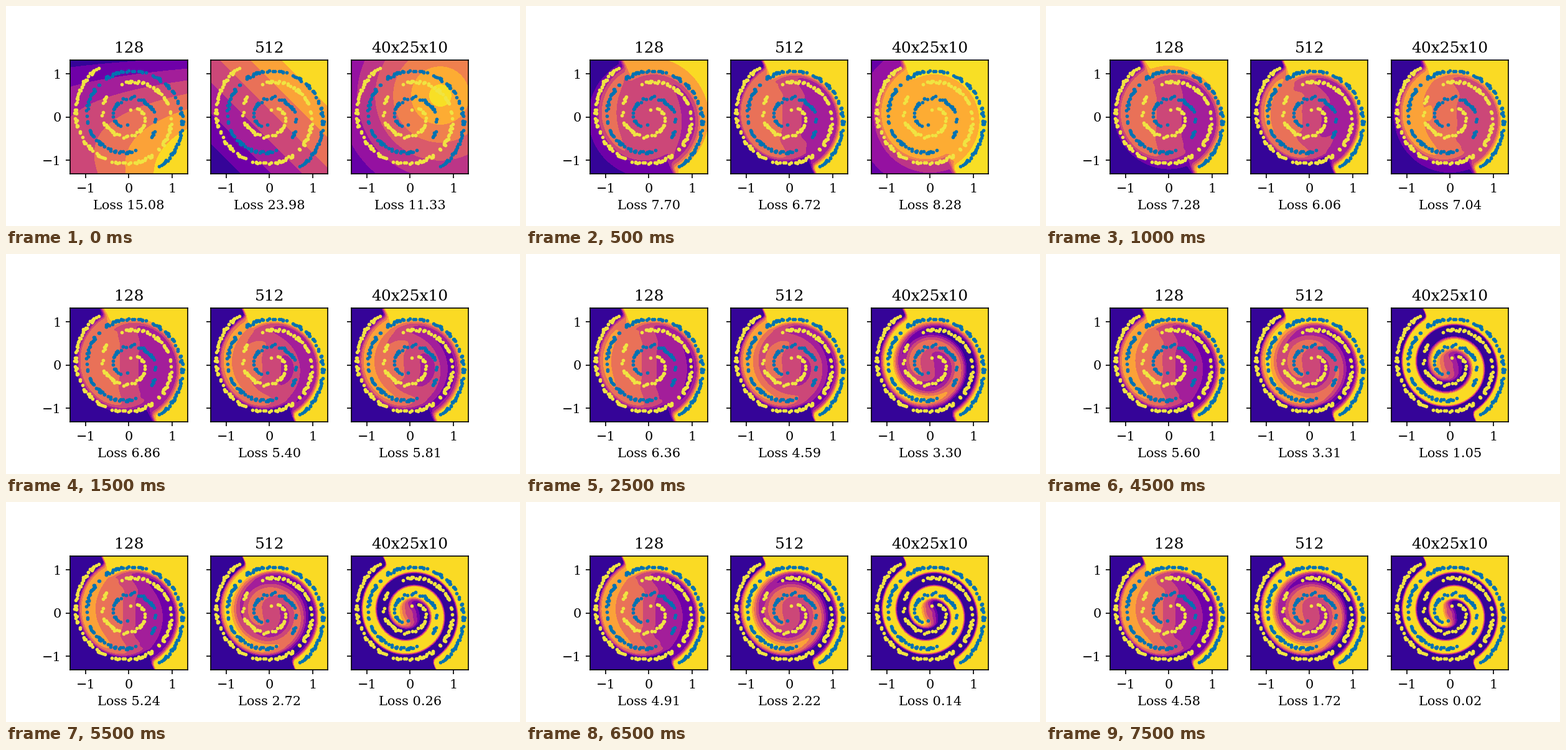
These frames come from a looping animation (826x354 px, 8000 ms). A matplotlib script:

```python
import numpy as np
import matplotlib.pyplot as plt
from matplotlib.animation import FuncAnimation

plt.rcParams["font.family"] = "DejaVu Serif"

DPI = 150
XMAX, YMAX = 1.356, 1.318
TITLES = ["128", "512", "40x25x10"]
BLUE, YELLOW = "#0072b2", "#f0e442"

# Loss of each network at a few key times
LOSS_T = [0, 1, 3, 5, 7, 11, 15]
LOSS = [
    [15.08, 7.70, 6.86, 6.36, 5.96, 5.24, 4.58],
    [23.98, 6.72, 5.40, 4.59, 3.90, 2.72, 1.72],
    [11.33, 8.28, 5.81, 3.30, 1.84, 0.26, 0.02],
]

X, Y = np.meshgrid(np.linspace(-XMAX, XMAX, 140), np.linspace(-YMAX, YMAX, 140))
R = np.hypot(X, Y)


def smooth(z, size=11):
    """Separable blur with the edges repeated."""
    k = np.hanning(size + 2)[1:-1]
    k /= k.sum()
    z = np.pad(z, size // 2, mode="edge")
    for axis in (0, 1):
        z = np.apply_along_axis(np.convolve, axis, z, k, mode="valid")
    return z


def spiral(limit=13.7):
    """Arm pattern (+1 yellow, -1 blue) and weight of the zone outside it."""
    a = np.arctan2(Y, X)
    last = np.pi * np.floor((limit + a) / np.pi) - a
    turn = np.minimum(np.maximum(10 * R, 2.8), last)
    w = np.clip((10 * R - last + np.pi / 2 + .6) / 1.6, 0, 1)
    return smooth(np.cos(turn + a - np.pi)), smooth(w * w * (3 - 2 * w))


ARMS, OUTSIDE = spiral()


def untrained(panel):
    """Almost linear ramps of the fresh networks."""
    if panel == 0:
        return 4.2 + .9 * X - 1.6 * Y - .7 * Y**2 - .5 * X * Y
    if panel == 1:
        return 3.75 + 1.4 * (X + Y)
    return 7.6 - 2.4 * np.hypot(X - .7, Y - .5)


def progress(panel, t):
    """Mean level, left-right slope, contrast inside and outside the spiral."""
    s = t - 1
    if panel == 0:
        return 3.5, 1.7 * (1 - np.exp(-t / 2.5)), .04 * t, 1.8 + .35 * t
    if panel == 1:
        return 3.6, 1.2 * np.exp(-t / 20), .25 * t, 3.5 + .5 * t
    return (3.2 + 3 * np.exp(-s), 1.6 * s * np.exp(-s / 2),
            .25 * s**2, 3 + .1 * s**2)


def field(panel, t):
    if t == 0:
        return untrained(panel)
    mean, slope, inner, outer = progress(panel, t)
    contrast = inner * R**1.5 * (1 - OUTSIDE) + outer * R / 1.2 * OUTSIDE
    tilt = slope * np.tanh(2 * X) * (1 - OUTSIDE)
    return mean - tilt - np.minimum(contrast, 12) * ARMS


def two_spirals(count=200, noise=.5):
    rng = np.random.RandomState(4)
    deg = 780 * np.sqrt(rng.rand(count))
    deg = deg[(deg > 95) & ((deg < 401) | (deg > 422))]
    n = np.radians(deg)
    x = -np.cos(n) * n + rng.rand(n.size) * noise
    y = np.sin(n) * n + rng.rand(n.size) * noise
    return x / 10, y / 10


fig, axes = plt.subplots(1, 3, sharey=True, dpi=DPI,
                         figsize=(826.01 / DPI, 354.01 / DPI))
sx, sy = two_spirals()
for ax, title in zip(axes, TITLES):
    ax.set(title=title, aspect="equal", xticks=[-1, 0, 1], yticks=[-1, 0, 1])
    for sign, color in ((-1, BLUE), (1, YELLOW)):
        ax.plot(sign * sx, sign * sy, "o", ms=2.7, mew=0, color=color)

fills = []


def update(t):
    while fills:
        fills.pop().remove()
    for i, ax in enumerate(axes):
        bands = 8 if i == 2 and t < 2 else 7
        z = np.clip(field(i, t), .02, bands - .02)
        fills.append(ax.contourf(X, Y, z, levels=np.arange(bands + 1), cmap="plasma"))
        ax.set_xlabel(f"Loss {np.interp(t, LOSS_T, LOSS[i]):.2f}")
        ax.set(xlim=(-XMAX, XMAX), ylim=(-YMAX, YMAX))
    return fills


anim = FuncAnimation(fig, update, frames=16, interval=500, repeat=True, repeat_delay=0)
plt.show()
```
